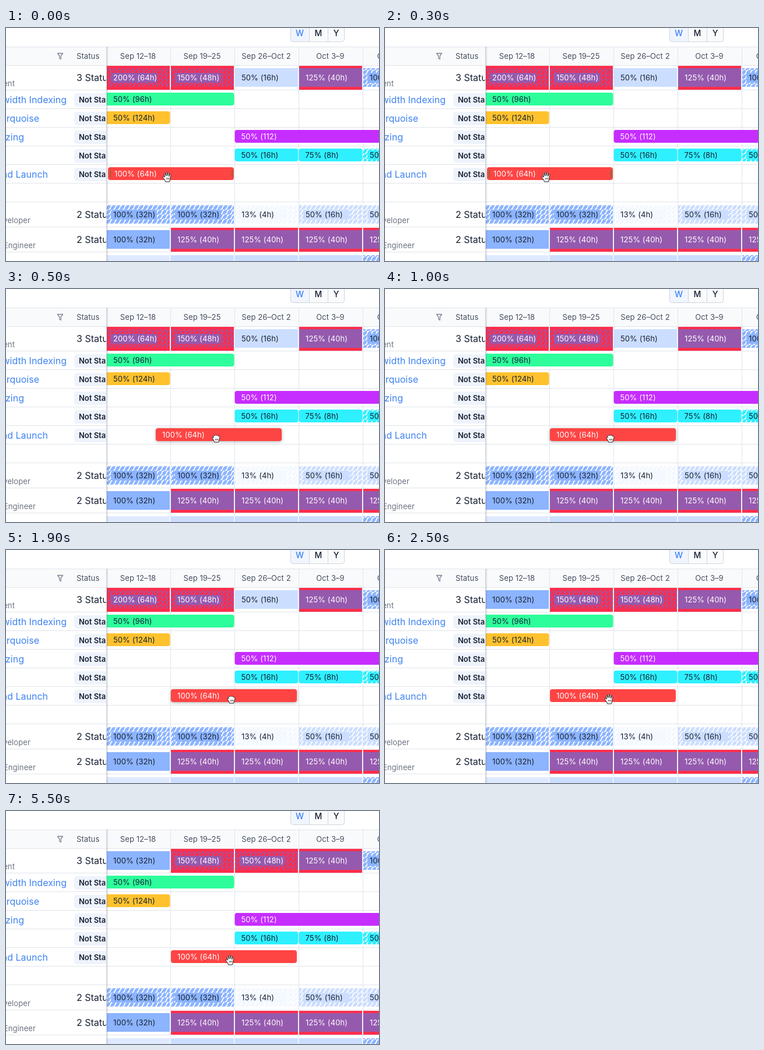
Animation of 640 by 400 pixels, one loop 7.5 s. Source, as an HTML page with a canvas:

```html
<!DOCTYPE html>
<html lang="en">
<head>
<meta charset="utf-8">
<title>Workload timeline</title>
<style>
html, body { margin: 0; width: 100%; height: 100%; overflow: hidden; background: #fff; }
canvas { display: block; width: 640px; height: 400px; }
</style>
</head>
<body>
<canvas id="stage" width="640" height="400"></canvas>
<script>
const ctx = document.getElementById('stage').getContext('2d');
const LOOP = 7500;
const LEFT = 173, COL = 110;
const INK = '#172033', GREY = '#6b7280', LINE = '#e1e4ea', LINK = '#3f83f1';
const BLUE = '#8cb4ff', PALE = '#ccdeff', MIST = '#e0eaff', FAINT = '#f4f8ff';
const RED = '#ff2d4b', PLUM = '#955aae', CYAN = '#2ef0ff';
const ROW_LINES = [106, 138, 170, 202, 234, 266, 298, 341, 384];

const steps = [
  { at: 0, bar: 175, hand: [276, 256], hover: true },
  { at: 500, bar: 257, hand: [360, 256], grab: true },
  { at: 1000, bar: 283, hand: [386, 256], grab: true },
  { at: 2500, bar: 283, hand: [384, 256], moved: true }
];

const colX = i => LEFT + i * COL;

function rect(x, y, w, h, color) {
  ctx.fillStyle = color;
  ctx.fillRect(x, y, w, h);
}

function round(x, y, w, h, r, color) {
  ctx.beginPath();
  ctx.roundRect(x, y, w, h, r);
  ctx.fillStyle = color;
  ctx.fill();
}

function text(str, x, y, { size = 13, weight = 400, color = INK, align = 'left', gap = 0.1 } = {}) {
  ctx.font = `${weight} ${size}px Inter, sans-serif`;
  ctx.letterSpacing = gap + 'px';
  ctx.textAlign = align;
  ctx.textBaseline = 'alphabetic';
  ctx.fillStyle = color;
  ctx.fillText(str, x, y);
}

// Rows of short squiggles that rise to the right
function squiggles(color) {
  const tile = document.createElement('canvas');
  tile.width = tile.height = 8;
  const g = tile.getContext('2d');
  g.strokeStyle = color;
  g.lineWidth = 1.8;
  for (const dx of [-8, 0, 8]) for (const dy of [-8, 0, 8]) {
    g.beginPath();
    g.moveTo(dx, dy + 7.5);
    g.bezierCurveTo(dx + 6, dy + 8, dx + 1, dy, dx + 7, dy + .5);
    g.stroke();
  }
  return ctx.createPattern(tile, 'repeat');
}
const whiteWave = squiggles('#ffffff');
const plumWave = squiggles(PLUM);

// One weekly total; over-booked weeks are taller and edged in red
function total(col, top, label, color, { over = false, wave = false } = {}) {
  const x = colX(col), w = COL - 2;
  if (over) {
    rect(x, top - 4, w, 41, RED);
    if (wave) rect(x, top, w, 32, plumWave);
    else rect(x, top, w, 32, PLUM);
  } else {
    rect(x, top, w, 32, color);
    if (wave) rect(x, top, w, 32, whiteWave);
  }
  if (!label) return;
  if (wave) round(x + 7, top + 8, 79, 17, 4, over ? PLUM : color);
  text(label, x + 11, top + 21, { color: over ? '#fff' : INK });
}

function task(x, y, w, color, label, light) {
  round(x, y, w, 22, 4, color);
  text(label, Math.max(x, LEFT) + 11, y + 16, { color: light ? '#fff' : INK });
}

function header() {
  rect(0, 32, 640, 32, '#f9fafb');
  rect(0, 32, 640, 1, LINE);
  rect(0, 64, 640, 1, LINE);

  ctx.beginPath();
  ctx.roundRect(488.5, -8, 92, 31.5, 4);
  ctx.fillStyle = '#fafbfc';
  ctx.fill();
  ctx.save();
  ctx.clip();
  rect(488, 0, 32, 24, '#f0f5fe');
  ctx.restore();
  ctx.strokeStyle = '#cfd4dc';
  ctx.lineWidth = 1;
  ctx.stroke();
  rect(520, 0, 1, 23, '#cfd4dc');
  rect(552, 0, 1, 23, '#cfd4dc');
  ['W', 'M', 'Y'].forEach((s, i) => text(s, [504, 536, 566.5][i], 14,
    { size: 14, weight: 500, color: i ? INK : LINK, align: 'center', gap: 0 }));
}

function grid() {
  for (let i = 1; i < 5; i++) rect(colX(i) - 1, 32, 1, 368, LINE);
  for (const y of ROW_LINES) rect(0, y, 640, 1, LINE);
  ['Sep 12–18', 'Sep 19–25', 'Sep 26–Oct 2', 'Oct 3–9', 'Oct 10–16'].forEach((s, i) =>
    text(s, colX(i) + 53.5, 53, { color: '#454e5f', align: 'center' }));
}

function totals(moved) {
  const hot = { over: true }, hotWave = { over: true, wave: true }, wave = { wave: true };
  if (moved) total(0, 69, '100% (32h)', BLUE);
  else total(0, 69, '200% (64h)', RED, hotWave);
  total(1, 69, '150% (48h)', RED, hotWave);
  if (moved) total(2, 69, '150% (48h)', RED, hotWave);
  else total(2, 69, '50% (16h)', PALE);
  total(3, 69, '125% (40h)', RED, hot);
  total(4, 69, '100% (32h)', BLUE, wave);

  total(0, 304, '100% (32h)', BLUE, wave);
  total(1, 304, '100% (32h)', BLUE, wave);
  total(2, 304, '13% (4h)', FAINT, wave);
  total(3, 304, '50% (16h)', PALE, wave);
  total(4, 304, '50% (16h)', PALE, wave);

  total(0, 347, '100% (32h)', BLUE);
  for (let i = 1; i < 5; i++) total(i, 347, '125% (40h)', RED, hot);

  [MIST, PALE, PALE, PALE].forEach((color, i) => total(i, 390, '', color));
  total(4, 390, '', BLUE, wave);
}

function tasks(step) {
  task(LEFT - 10, 111, 228.5, '#2dfd9b', '50% (96h)');
  task(LEFT - 10, 143, 118.5, '#ffc22e', '50% (124h)');
  task(392.5, 175, 260, '#c62dff', '50% (112)', true);
  task(392.5, 207, 109, CYAN, '50% (16h)');
  task(502.5, 207, 109, CYAN, '75% (8h)');
  round(612.5, 207, 109, 22, 4, CYAN);
  round(612.5, 207, 109, 22, 4, whiteWave);
  round(620, 210, 79, 16, 4, CYAN);
  text('50% (16h)', 624, 223);

  ctx.save();
  if (step.grab) {
    ctx.shadowColor = 'rgba(0,0,0,.35)';
    ctx.shadowBlur = 5;
    ctx.shadowOffsetY = 1;
  }
  round(step.bar, 239, 216, 22, 4, '#ff4444');
  ctx.restore();
  text('100% (64h)', step.bar + 11, 255, { color: '#fff' });
  if (step.hover) {
    round(step.bar + 3, 243, 2, 14, 1, '#8f6b2e');
    round(step.bar + 212, 243, 2, 14, 1, '#8f6b2e');
  }
}

function sidebar() {
  ctx.save();
  ctx.beginPath();
  ctx.rect(0, 0, LEFT - 1, 400);
  ctx.clip();
  rect(0, 65, LEFT, 335, '#fff');
  rect(0, 33, LEFT, 31, '#f9fafb');
  for (const y of ROW_LINES) rect(0, y, LEFT, 1, LINE);

  ctx.strokeStyle = '#7b8494';
  ctx.lineWidth = 1.3;
  ctx.lineJoin = 'round';
  ctx.stroke(new Path2D('M88.5 43.5H97.5L94.2 48V53.5L91.8 52V48Z'));
  text('Status', 121, 53, { color: '#454e5f' });

  [['3', 91], ['2', 326], ['2', 369]].forEach(([n, y]) =>
    text(n + ' Statuses', 121, y, { size: 16, gap: 0 }));
  [['ent', 15, 100], ['veloper', 42, 335], ['Engineer', 51, 378]].forEach(([s, x, y]) =>
    text(s, x, y, { color: GREY, align: 'right' }));
  ['width Indexing', 'urquoise', 'izing', '', 'nd Launch'].forEach((s, i) => {
    const y = 112 + i * 32;
    text(s, [104, 57, 31, 0, 72][i], y + 17, { size: 16, color: LINK, align: 'right', gap: 0 });
    round(117, y, 80, 23, 5, '#eef3fc');
    text('Not Started', 125, y + 16, { weight: 600, gap: 0 });
  });
  ctx.restore();

  const shade = ctx.createLinearGradient(LEFT - 1, 0, LEFT + 3, 0);
  shade.addColorStop(0, 'rgba(60,70,90,.25)');
  shade.addColorStop(1, 'rgba(60,70,90,0)');
  rect(LEFT - 1, 32, 4, 368, shade);
  rect(LEFT - 1, 32, 1, 368, '#ccd1da');
}

const openHand = new Path2D('M-3 8L-4 5L-7 1C-8-1-6-2-4 0L-5-5C-5-7-3-7-3-5L-2-2L-2-7C-2-9 0-9 0-7L0-2L1-6C1-8 3-8 3-6L3-1L4-4C5-6 7-5 6-3L5 4L4 8Z');
const fist = new Path2D('M-3 7L-4 4L-6 1C-7-1-5-2-4-1L-5-3C-5-5-3-5-2-4C-2-6 0-6 1-4C2-6 4-5 4-3C6-4 7-2 6 0L5 4L4 7Z');
const knuckles = new Path2D('M-1 1V4M1 1V4M3 1V4');

function cursor({ hand, grab }) {
  ctx.save();
  ctx.translate(hand[0] + .5, hand[1]);
  const shape = grab ? fist : openHand;
  ctx.lineJoin = 'round';
  ctx.fillStyle = '#fff';
  ctx.strokeStyle = '#222';
  ctx.lineWidth = 1;
  ctx.fill(shape);
  ctx.stroke(shape);
  ctx.lineWidth = .8;
  ctx.stroke(knuckles);
  ctx.restore();
}

function draw(now) {
  const t = now % LOOP;
  const step = steps.findLast(s => t >= s.at) || steps[0];
  rect(0, 0, 640, 400, '#fff');
  header();
  grid();
  totals(step.moved);
  tasks(step);
  sidebar();
  cursor(step);
}

const start = performance.now();
function tick() {
  draw(performance.now() - start);
  requestAnimationFrame(tick);
}
tick();
</script>
</body>
</html>
```
